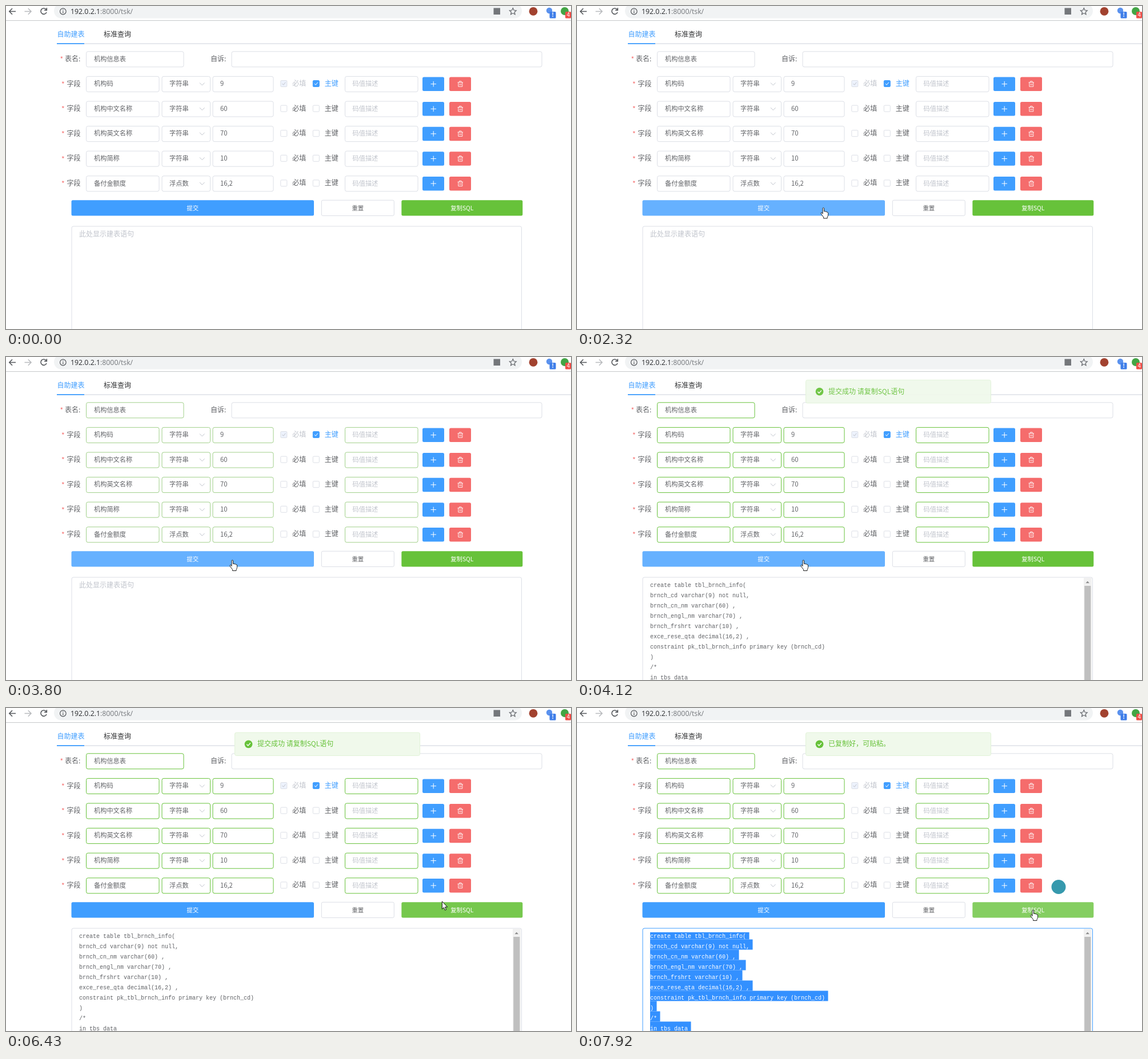
Write an HTML page that moves like this. It is 989 px wide and 566 px high and loops after 8 s.

```html
<!DOCTYPE html>
<html lang="zh-CN">
<head>
<meta charset="utf-8">
<title>自助建表</title>
<style>
html, body { margin: 0; width: 100%; height: 100%; overflow: hidden; background: #fff; }
svg { display: block; font-family: "Noto Sans CJK SC", "Noto Sans CJK", sans-serif; font-size: 12px; }
.sql { font: 10px "Liberation Mono", monospace; }
.url { font: 12.3px "Open Sans", sans-serif; }
.line { fill: none; stroke-width: 1.5; }
</style>
</head>
<body>
<svg id="stage" width="989" height="566" viewBox="0 0 989 566"></svg>
<script>
const BLUE = '#409eff', GREEN = '#67c23a', RED = '#f56c6c';
const EDGE = '#dcdfe6', INK = '#606266', PALE = '#c0c4cc';
const $ = id => document.getElementById(id);

// Static markup helpers
const text = (x, y, s, fill = INK, size = 12, extra = '') =>
  `<text x="${x}" y="${y}" fill="${fill}" font-size="${size}" ${extra}>${s}</text>`;
const rect = (x, y, w, h, fill, extra = '') =>
  `<rect x="${x}" y="${y}" width="${w}" height="${h}" fill="${fill}" ${extra}/>`;
const disc = (x, y, r, fill) => `<circle cx="${x}" cy="${y}" r="${r}" fill="${fill}"/>`;
const line = (d, stroke, extra = '') => `<path d="${d}" fill="none" stroke="${stroke}" ${extra}/>`;
const field = (x, y, w, cls = 'field') =>
  rect(x, y, w, 27, '#fff', `rx="3" stroke="${EDGE}" class="${cls}"`);
const button = (id, x, w, fill, label, ink, stroke) =>
  rect(x, 340.3, w, 27.2, fill, `rx="2.5" id="${id}" stroke="${stroke}"`) +
  text(x + w / 2, 357.6, label, ink, 10.4, `text-anchor="middle" id="${id}Text"`);

function checkbox(x, y, label, state) {
  const look = {
    off: ['#fff', EDGE, 'none', INK],
    disabled: ['#edf2fc', EDGE, PALE, PALE],
    on: [BLUE, BLUE, '#fff', BLUE]
  }[state];
  return rect(x, y - 5.5, 11, 11, look[0], `rx="1.5" stroke="${look[1]}"`) +
    line(`M${x + 2.8} ${y}l2 2.3 3.7-4.6`, look[2]) +
    text(x + 20.5, y + 4, label, look[3]);
}

function row([name, type, size], i) {
  const y = 136.7 + i * 43.6, top = y - 13.3;
  return text(97, y + 5, '*', RED) + text(106.5, y + 3.8, '字段') +
    field(140.5, top, 127.5) + text(154, y + 3.4, name, INK, 11.2) +
    field(273, top, 84.5) + text(286, y + 3.4, type, INK, 11.2) +
    line(`M339 ${y - 2.2}l4.3 4.4 4.3-4.4`, PALE) +
    field(362, top, 106) + text(375, y + 3.4, size, INK, 11.2) +
    checkbox(480.8, y - .7, '必填', i ? 'off' : 'disabled') +
    checkbox(537.3, y - .7, '主键', i ? 'off' : 'on') +
    field(593.5, top, 127.5) + text(606.5, y + 3.4, '码值描述', PALE, 11.2) +
    rect(729, y - 12.2, 38, 24.5, BLUE, 'rx="2.5"') +
    line(`M743.5 ${y}h9.5M748.2 ${y - 4.8}v9.6`, '#fff') +
    rect(776, y - 12.2, 38, 24.5, RED, 'rx="2.5"') +
    line(`M790.5 ${y - 2.8}h9.5M793.5 ${y - 3}v-1.8h3.5v1.8M791.8 ${y - 2.8}v7.3h7v-7.3M794.2 ${y - .5}v2.8M796.5 ${y - .5}v2.8`, '#fff', 'stroke-width=".9"');
}

const browser =
  rect(0, 0, 989, 25, '#fff') + rect(0, 25, 989, 1, '#c6c8ca') +
  rect(84, -4, 819, 25.5, '#f1f3f4', 'rx="12.7"') +
  line('M17 9.5H6M11 4.3L5.8 9.5l5.2 5.2', '#55585c', 'stroke-width="1.6"') +
  line('M32.5 9.5h11M38.8 4.3L44 9.5l-5.2 5.2', '#b9bbbe', 'stroke-width="1.6"') +
  line('M70.3 6A5.2 5.2 0 1 0 71 11M71.3 3.2v4.2h-4.2', '#55585c', 'stroke-width="1.6"') +
  line('M94.5 9.5a5.3 5.3 0 1 0 10.6 0a5.3 5.3 0 1 0-10.6 0M99.8 8.7v4M99.8 6v1.4', '#55585c', 'stroke-width="1.2"') +
  `<text class="url" x="113" y="13.7" fill="#2b2d30">192.0.2.1<tspan fill="#75787c">:8000/tsk/</tspan></text>` +
  rect(853.5, 3.5, 11.5, 11.5, '#74777b') +
  line('M887.3 3.6l1.8 3.9 4.1.4-3.1 2.8.9 4.1-3.7-2.2-3.7 2.2.9-4.1-3.1-2.8 4.1-.4z', '#606368', 'stroke-width="1.2"') +
  disc(923, 9.3, 7.4, '#a2422f') +
  disc(951, 8, 5.2, '#5b92ee') + rect(951.5, 10, 11, 11.5, '#3f7ee8', 'rx="1.5"') +
  text(957, 19.4, '!', '#fff', 10, 'text-anchor="middle" font-weight="700"') +
  disc(978, 9, 7, '#43a545') + rect(979, 10, 10, 11.5, '#ef4f48', 'rx="1.5"') +
  text(984.2, 19.4, '4', '#fff', 10, 'text-anchor="middle"');

const rows = [
  ['机构码', '字符串', '9'], ['机构中文名称', '字符串', '60'], ['机构英文名称', '字符串', '70'],
  ['机构简称', '字符串', '10'], ['备付金额度', '浮点数', '16,2']
];
const sql = [
  'create table tbl_brnch_info(', 'brnch_cd varchar(9) not null,', 'brnch_cn_nm varchar(60) ,',
  'brnch_engl_nm varchar(70) ,', 'brnch_frshrt varchar(10) ,', 'exce_rese_qta decimal(16,2) ,',
  'constraint pk_tbl_brnch_info primary key (brnch_cd)', ')', '/*', 'in tbs data'
];
const band = (s, i) => {
  const top = i ? 387.5 + i * 18 : 393;
  return rect(128, top, s.length * 6 + 5.5, 405.5 + i * 18 - top, '#3390ff');
};

$('stage').innerHTML =
  text(89.5, 54, '自助建表', BLUE) + text(171, 54, '标准查询', '#303133') +
  rect(89, 65.2, 900, 1.6, '#e0e3e9') + rect(89, 65, 48, 1.8, BLUE) +
  text(94.5, 97.5, '*', RED) + text(103, 96.5, '表名:') +
  field(140.5, 79.8, 170.5) + text(154, 96.8, '机构信息表', INK, 11.2) +
  text(358, 96.5, '自诉:') + field(395, 79.8, 543, '') +
  rows.map(row).join('') +
  button('submit', 114.5, 424.5, BLUE, '提交', '#fff', 'none') +
  button('reset', 552.3, 127, '#fff', '重置', INK, EDGE) +
  button('copy', 692.3, 212, GREEN, '复制SQL', '#fff', 'none') +
  rect(115, 386, 787.5, 200, '#fff', `rx="3" id="area" stroke="${EDGE}"`) +
  text(128, 403.8, '此处显示建表语句', PALE, 12, 'id="hint"') +
  `<g id="result"><g id="picked">${sql.map(band).join('')}</g><g id="code" class="sql">` +
  sql.map((s, i) => `<text x="128" y="${403.3 + i * 18}">${s}</text>`).join('') + '</g>' +
  rect(887, 387, 14, 180, '#f1f1f1') + rect(888.3, 401, 11, 170, '#bfbfbf') +
  '<path d="M890.5 396.3l3.2-3.6 3.2 3.6z" fill="#8a8a8a"/></g>' +
  `<g id="bowl">${disc(843, 313.5, 12.5, '#3699ad')}</g>` +
  '<g id="toast">' + rect(400.5, 43, 324, 40.5, '#f0f9eb', 'rx="3" stroke="#e1f3d8"') +
  disc(424.5, 63.3, 6.9, GREEN) + line('M421.3 63.5l2.4 2.4 4.2-4.6', '#fff', 'stroke-width="1.4"') +
  text(440, 67.4, '', GREEN, 12, 'id="note"') + '</g>' + browser +
  '<path id="cursor" stroke-linejoin="round"/>';

// Times at which the picture is renewed: [first, last, steps]
const runs = [
  [540, 700, 3], [930, 1150, 4], [1470, 1790, 5], [2080, 2400, 5], [2610, 2610, 1],
  [2840, 3090, 4], [3560, 3560, 1], [3800, 4270, 7], [4580, 4960, 6], [5340, 5580, 4],
  [5820, 6040, 4], [6270, 6580, 5], [6730, 6990, 4], [7550, 7920, 6]
];
function snap(t) {
  const run = runs.findLast(r => t >= r[0]);
  if (!run) return 0;
  const [a, b, n] = run, step = (b - a) / (n - 1 || 1);
  return step ? a + Math.floor((Math.min(t, b) - a) / step + 1e-6) * step : a;
}

// Pointer path: [time, x, y]
const path = [
  [540, 783, 502], [700, 672, 438], [860, 672, 438], [1150, 553.5, 425], [1400, 553.5, 425],
  [1470, 551.5, 429], [1790, 459.5, 397.5], [2000, 459.5, 397.5], [2400, 424, 342],
  [2530, 424, 342], [2610, 423, 342], [2760, 423, 342], [3090, 396, 355.5], [4500, 396, 355.5],
  [4960, 219.5, 455.5], [5260, 219.5, 455.5], [5580, 443.5, 424], [5740, 443.5, 424],
  [6040, 645, 354], [6200, 645, 354], [6430, 766, 338.5], [6580, 782, 344],
  [6650, 782, 344], [6990, 798, 353.5]
];
function pointer(t) {
  const i = path.findLastIndex(p => t >= p[0]);
  const a = path[i], b = path[i + 1] || a;
  const p = b === a ? 0 : (t - a[0]) / (b[0] - a[0]);
  return [a[1] + (b[1] - a[1]) * p, a[2] + (b[2] - a[2]) * p];
}
const shapes = {
  beam: ['M-3-7.3H3M0-7.3V7.3M-3 7.3H3', 'none', '#333'],
  arrow: ['M0 0V13.5L3 10.8 5 15.5 7.2 14.6 5.2 10H9.3Z', '#fff', '#111'],
  hand: ['M-1 11V1.5Q-1 .5 .2 .5T1.5 1.5V7Q3.8 5.8 4 7.5Q6 6.5 6.3 8.2Q8.5 7.8 8.5 9.5V13Q8.5 15 7 17V19H.5V17L-3.5 11.5Q-5 9.5-3.5 9T-1 11Z', '#fff', '#222']
};
function shapeAt(x, y) {
  if (y > 386 && x > 115 && x < 887) return 'beam';
  const onButton = y > 340 && y < 367.5 && (x < 539 || x > 552 && x < 679.5 || x > 692);
  return onButton ? 'hand' : 'arrow';
}

// Value in force at time t: alternating start times and values
function at(t, first, ...changes) {
  for (const [time, value] of changes) if (t >= time) first = value;
  return first;
}
const clamp = v => Math.max(0, Math.min(1, v));
const ease = p => 1 - (1 - p) ** 2.4;
const set = (id, name, value) => $(id).setAttribute(name, value);
const show = (id, on) => set(id, 'visibility', on ? 'visible' : 'hidden');

function draw(t) {
  set('submit', 'fill', at(t, BLUE, [2230, '#53a8ff'], [2310, '#66b1ff'], [3560, '#3a8ee6'], [3800, '#66b1ff'], [4650, BLUE]));
  set('copy', 'fill', at(t, GREEN, [6400, '#76c84d'], [6500, '#85ce61'], [7550, '#64b23c'], [7620, '#5daf34'], [7690, '#85ce61']));
  const onReset = t > 6000 && t < 6260;
  set('reset', 'fill', onReset ? '#ecf5ff' : '#fff');
  set('reset', 'stroke', onReset ? '#c6e2ff' : EDGE);
  set('resetText', 'fill', onReset ? BLUE : INK);
  set('area', 'stroke', at(t, EDGE, [620, PALE], [2080, EDGE], [4660, PALE], [5910, EDGE], [7620, BLUE]));
  const edge = at(t, EDGE, [3800, '#a1d08a'], [3870, GREEN]);
  document.querySelectorAll('.field').forEach(f => f.setAttribute('stroke', edge));

  const done = t >= 3870, picked = t >= 7620;
  show('hint', !done);
  show('result', done);
  show('picked', picked);
  set('code', 'fill', picked ? '#fff' : INK);
  show('bowl', t >= 7690);

  const second = t >= 7600;
  const enter = ease(clamp((t - (second ? 7600 : 3910)) / 300));
  const leave = second ? 0 : clamp((t - 6810) / 180);
  $('note').textContent = second ? '已复制好，可贴粘。' : '提交成功 请复制SQL语句';
  set('toast', 'opacity', enter * (1 - leave));
  set('toast', 'transform', `translate(0 ${-40.5 * (1 - enter + leave * leave)})`);

  show('cursor', t >= 540);
  if (t >= 540) {
    const [x, y] = pointer(t), [d, fill, stroke] = shapes[shapeAt(x, y)];
    set('cursor', 'd', d);
    set('cursor', 'fill', fill);
    set('cursor', 'stroke', stroke);
    set('cursor', 'transform', `translate(${x} ${y})`);
  }
}

const start = performance.now();
function frame() {
  draw(snap((performance.now() - start) % 8000));
  requestAnimationFrame(frame);
}
frame();
</script>
</body>
</html>
```
